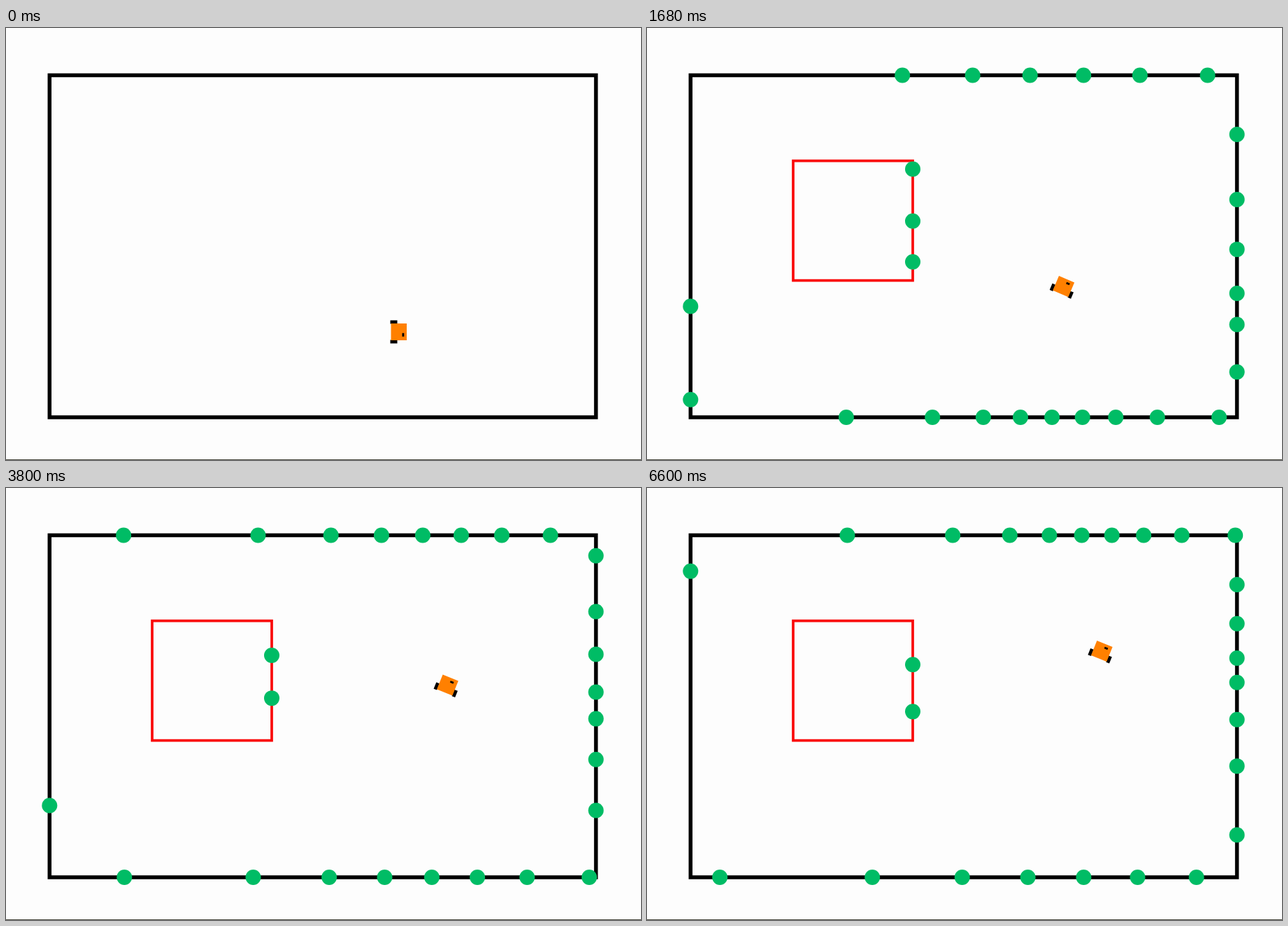
An HTML page with a canvas for the animation above (6620 ms loop, 908 by 617 pixels).

```html
<!DOCTYPE html>
<html lang="en">
<head>
<meta charset="utf-8">
<title>Robot range scan</title>
<style>
html, body { margin: 0; width: 100%; height: 100%; overflow: hidden; background: #fdfdfd; }
canvas { display: block; }
</style>
</head>
<body>
<canvas id="stage" width="908" height="617"></canvas>
<script>
const ctx = document.getElementById('stage').getContext('2d');
const LOOP = 6620, STEPS = 143, RAD = Math.PI / 180;
const room = { l: 62.3, t: 67.5, r: 843.6, b: 556 };
const box = { l: 209, t: 189.7, r: 380, b: 360.6 };

// Waypoints the rear axle passes through: step, x, y
const keys = [
  [0, 551, 434], [19, 575, 412], [36, 591.5, 379], [56, 606.5, 342.5],
  [82, 627.4, 291.5], [116, 644.5, 248.5], [142, 646.3, 243]
];

// Drive towards the goal: turn quickly, cruise, then slow down in proportion
function drive() {
  const path = [];
  let x = 551, y = 434, left = 219;
  for (let i = 0; i < STEPS; i++) {
    const h = -68 * RAD * (1 - Math.exp(-Math.max(0, i - 2) / 8));
    path.push({ x, y, h });
    const v = i < 2 ? 0 : Math.min(2.07, 0.064 * left);
    x += v * Math.cos(h);
    y += v * Math.sin(h);
    left -= v;
  }
  return path;
}

// Shift the driven path so that it meets the waypoints
function fit(path) {
  const off = keys.map(([i, x, y]) => [x - path[i].x, y - path[i].y]);
  return path.map((p, i) => {
    let k = 0;
    while (k < keys.length - 2 && i >= keys[k + 1][0]) k++;
    const u = (i - keys[k][0]) / (keys[k + 1][0] - keys[k][0]);
    const mix = c => off[k][c] + (off[k + 1][c] - off[k][c]) * u;
    return { x: p.x + mix(0), y: p.y + mix(1), h: p.h };
  });
}

const path = fit(drive());

// Entry and exit distances of a ray through a rectangle
function cross(p, dx, dy, q) {
  const xs = [(q.l - p.x) / dx, (q.r - p.x) / dx];
  const ys = [(q.t - p.y) / dy, (q.b - p.y) / dy];
  return {
    enter: Math.max(Math.min(...xs), Math.min(...ys)),
    leave: Math.min(Math.max(...xs), Math.max(...ys))
  };
}

function outline(q, color, width) {
  ctx.strokeStyle = color;
  ctx.lineWidth = width;
  ctx.strokeRect(q.l, q.t, q.r - q.l, q.b - q.t);
}

function scan(p) {
  ctx.fillStyle = '#00bc65';
  for (let a = 0; a < 360; a += 14) {
    const dx = Math.cos(a * RAD), dy = -Math.sin(a * RAD);
    const hit = cross(p, dx, dy, box);
    const d = hit.enter > 0 && hit.enter < hit.leave ? hit.enter : cross(p, dx, dy, room).leave;
    ctx.beginPath();
    ctx.arc(p.x + dx * d, p.y + dy * d, 11, 0, 7);
    ctx.fill();
  }
}

function robot(p) {
  ctx.save();
  ctx.translate(p.x, p.y);
  ctx.rotate(p.h);
  ctx.fillStyle = '#000';
  ctx.fillRect(-1.5, -16.5, 10, 5);
  ctx.fillRect(-1.5, 11.5, 10, 5);
  ctx.fillStyle = '#ff8000';
  ctx.fillRect(-0.5, -12, 22.5, 24);
  ctx.fillStyle = '#000';
  ctx.fillRect(15.5, 1.7, 2.8, 5);
  ctx.restore();
}

// Steps last 20, 100 and 20 ms in turn
function stepAt(t) {
  const r = t % 140;
  return Math.min(STEPS - 1, 3 * Math.floor(t / 140) + (r < 20 ? 0 : r < 120 ? 1 : 2));
}

function draw() {
  const i = stepAt(performance.now() % LOOP), p = path[i];
  ctx.fillStyle = '#fdfdfd';
  ctx.fillRect(0, 0, 908, 617);
  ctx.fillStyle = '#4a4a40';
  ctx.fillRect(0, 616, 908, 1);
  outline(room, '#000', 5.5);
  if (i > 0) {
    outline(box, '#fa0505', 3.7);
    scan(p);
  }
  robot(p);
  requestAnimationFrame(draw);
}
draw();
</script>
</body>
</html>
```
